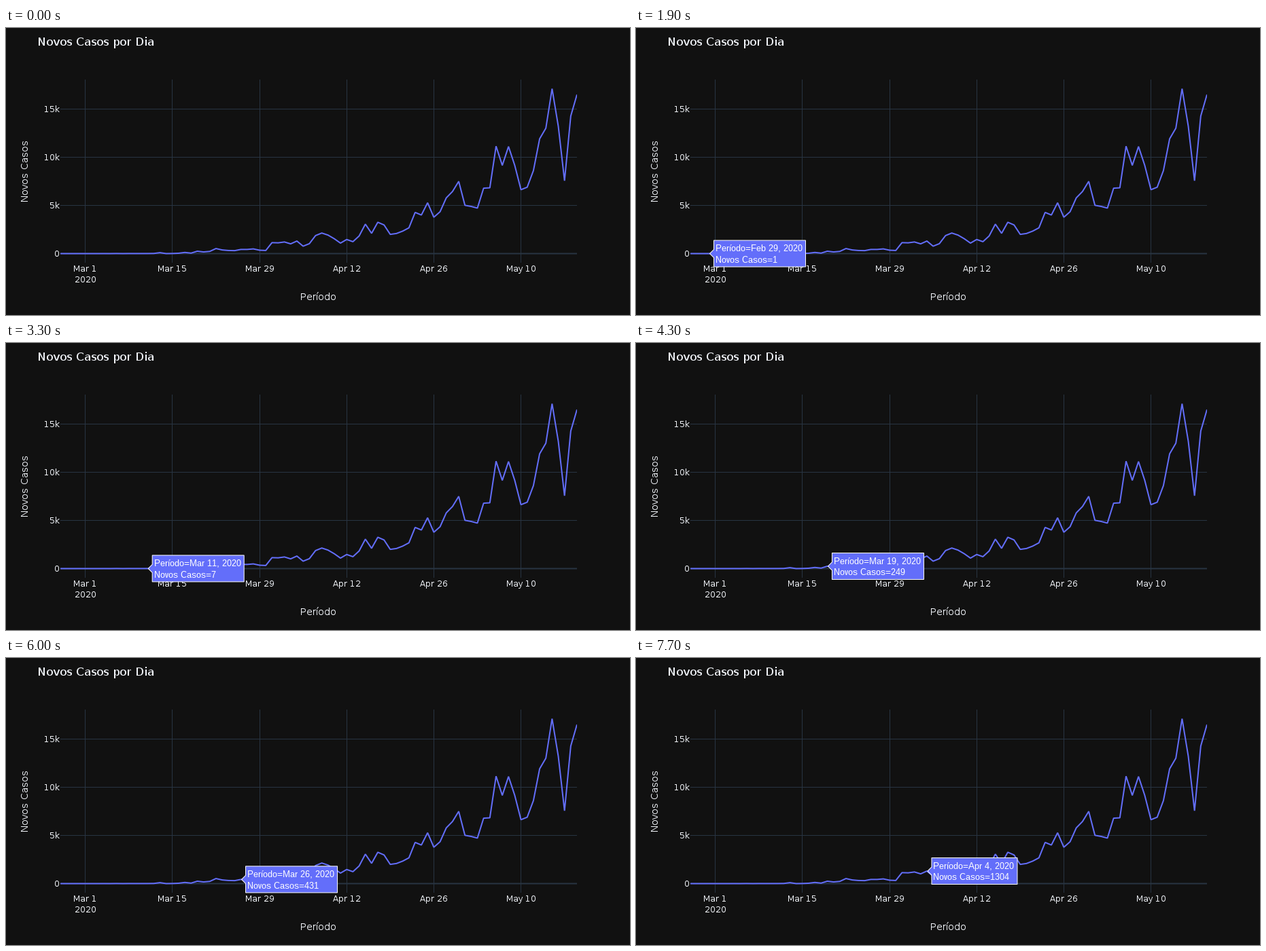
Write a matplotlib script that moves like this. It is 918 px wide and 423 px high and loops after 8000 ms.

```python
import math

import matplotlib.pyplot as plt
import numpy as np
from matplotlib.animation import FuncAnimation
from matplotlib.patches import Polygon, Rectangle

# Whole-pixel glyph advances keep the small text crisp.
plt.rcParams.update({
    "text.hinting": "native",
    "text.hinting_factor": 1,
    "path.simplify": False,
})

W, H, DPI = 918, 423, 72
LEFT, RIGHT, TOP, BOTTOM = 80, 840, 76, 346
BACK, GRID, BLUE, INK = "#111111", "#283442", "#636efa", "#f2f5fa"
MONTHS = {"02": "Feb", "03": "Mar", "04": "Apr", "05": "May"}

CASES = np.array([
    1, 0, 0, 1, 0, 0, 0, 2, 0, 9, 0, 7, 5, 6, 7, 14, 99, 0, 11, 38, 121, 51,
    249, 172, 228, 525, 378, 323, 307, 431, 432, 487, 352, 323, 1138, 1119,
    1208, 1012, 1304, 770, 1031, 1873, 2136, 1922, 1546, 1089, 1465, 1238,
    1832, 3058, 2105, 3257, 2976, 1996, 2089, 2336, 2678, 4279, 4007, 5281,
    3776, 4346, 5789, 6450, 7502, 5015, 4898, 4726, 6794, 6835, 11156, 9162,
    11121, 9167, 6638, 6895, 8620, 11923, 13028, 17126, 13220, 7569, 14288,
    16517])

# The pointer moves along the line: the tick of each step and the day it hits.
STEPS = [9, 10, 19, 20, 21, 23, 25, 26, 28, 29, 30, 31, 33, 35, 36, 37, 38, 39,
         41, 43, 45, 49, 51, 53, 56, 58, 60, 61, 63, 66, 68, 70, 72, 73, 77]
DAYS = [d for d in range(39) if d not in (2, 6, 20, 37)]


def day_x(day):
    return LEFT + (RIGHT - LEFT) * day / (len(CASES) - 1)


def case_y(cases):
    pad = 0.05 * (BOTTOM - TOP)
    return BOTTOM - pad - (BOTTOM - TOP - 2 * pad) * cases / CASES.max()


def day_name(day):
    year, month, date = str(np.datetime64("2020-02-26") + day).split("-")
    return f"{MONTHS[month]} {int(date)}, {year}"


fig = plt.figure(figsize=(W / DPI, H / DPI), dpi=DPI, facecolor=BACK)
ax = fig.add_axes([0, 0, 1, 1])
ax.set(xlim=(0, W), ylim=(H, 0))
ax.axis("off")


def rule(xs, ys, width=1):
    ax.plot(xs, ys, color=GRID, lw=width, solid_capstyle="butt",
            snap=False, zorder=1)


def write(x, y, text, size, ha="center", **style):
    # The three-per-em space suits the wide face better than its own space.
    ax.text(x, y, text.replace(" ", "\u2004"), family="DejaVu Sans",
            size=size, color=INK, ha=ha, va="baseline", zorder=3, **style)


for day in range(4, len(CASES), 14):
    x = day_x(day)
    rule([math.floor(x) + 0.5] * 2, [TOP, BOTTOM])
    write(x, 359, day_name(day).split(",")[0], 12)
write(day_x(4), 375, "2020", 12)

for k in (0, 5, 10, 15):
    y = case_y(1000 * k)
    if k:
        rule([LEFT, RIGHT], [math.floor(y) + 0.5] * 2)
    else:
        rule([LEFT, RIGHT], [y, y], 2)
    write(79, round(y + 4.2), f"{k}k" if k else "0", 12, "right")

write(46, 26, "Novos Casos por Dia", 17, "left")
write(460, 401, "Período", 14)
write(33, 211, "Novos Casos", 14, rotation=90, rotation_mode="anchor")

curve, = ax.plot(day_x(np.arange(len(CASES))), case_y(CASES), color=BLUE,
                 lw=2, solid_joinstyle="bevel", solid_capstyle="butt",
                 snap=False, zorder=2)
curve.set_clip_path(Rectangle((LEFT, TOP), RIGHT - LEFT, BOTTOM - TOP,
                              transform=ax.transData))

bubble = Polygon([(0, 0), (1, 1), (1, 0)], closed=True, fc=BLUE, ec="white",
                 lw=1, joinstyle="miter", snap=False, zorder=4)
ax.add_patch(bubble)
lines = [ax.text(0, 0, "", family="Liberation Sans", size=13, color="white",
                 ha="left", va="baseline", zorder=5) for _ in range(2)]


def show_label(day):
    x, y = day_x(day) + 1, case_y(CASES[day])
    texts = f"Período={day_name(day)}", f"Novos Casos={CASES[day]}"
    for line, text, drop in zip(lines, texts, (-3.4, 13.3)):
        line.set_text(text)
        line.set_position((math.floor(x + 9), round(y + drop)))
    width = max(line.get_window_extent().width for line in lines) + 7
    near, far, half = x + 6, x + 6 + width, 19.5
    bubble.set_xy([(x, y), (near, y + 6), (near, y + half), (far, y + half),
                   (far, y - half), (near, y - half), (near, y - 6)])


def update(tick):
    step = int(np.searchsorted(STEPS, tick, side="right")) - 1
    for part in (bubble, *lines):
        part.set_visible(step >= 0)
    if step >= 0:
        show_label(DAYS[step])
    return bubble, *lines


anim = FuncAnimation(fig, update, frames=80, interval=100, repeat=True,
                     repeat_delay=0, blit=False)
plt.show()
```
